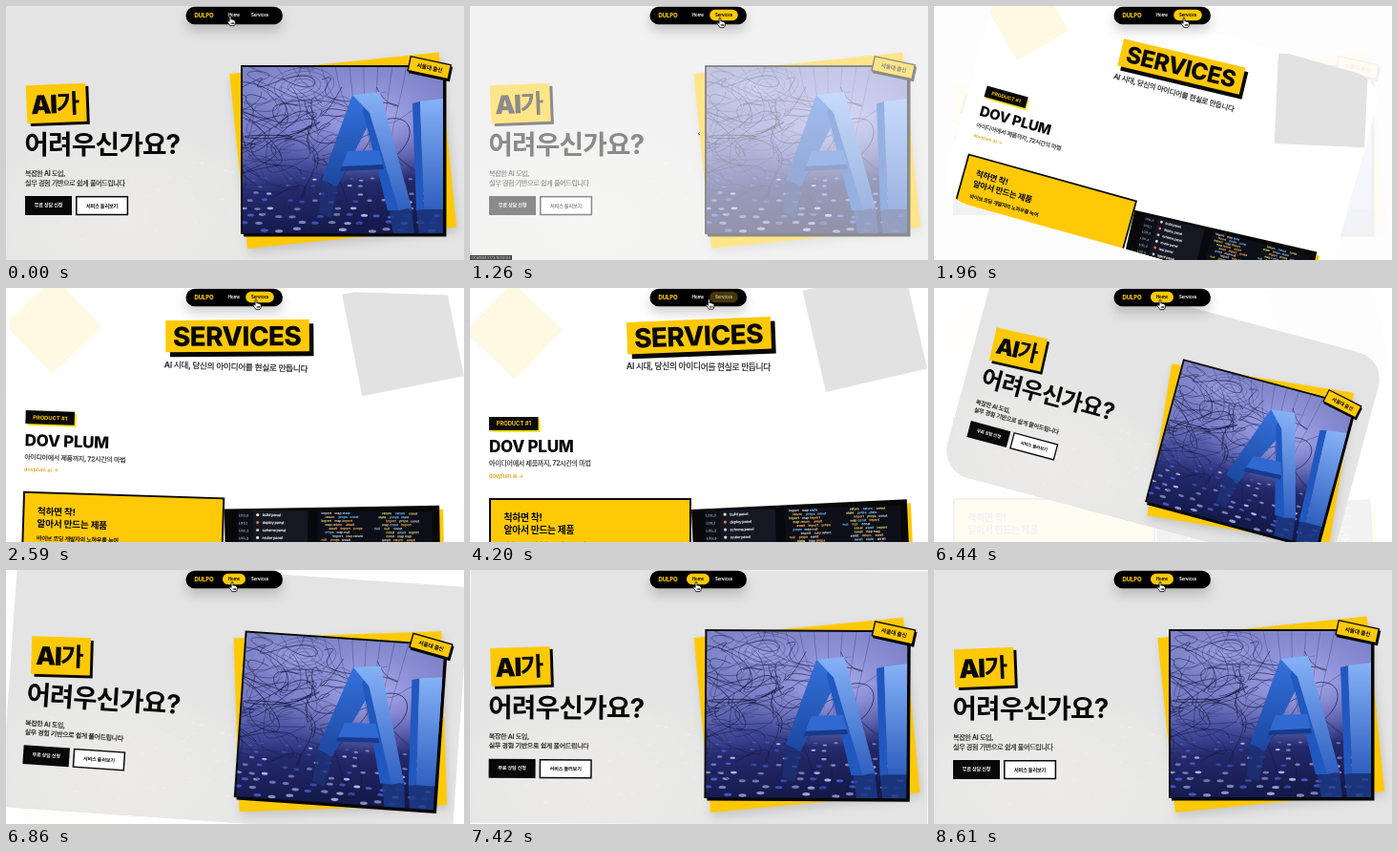
An HTML page for the animation above (8.68 s loop, 480 by 266 pixels).

```html
<!DOCTYPE html>
<html lang="ko">
<head>
<meta charset="utf-8">
<title>Page transition</title>
<style>
html, body { margin: 0; width: 100%; height: 100%; overflow: hidden; background: #fff; }
#stage { position: relative; width: 480px; height: 266px; overflow: hidden; background: #fff; }
.page { position: absolute; left: 0; top: 0; width: 480px; overflow: hidden; transform-origin: 240px 133px; }
#home { height: 266px; background: #e4e4e4; }
#services { height: 280px; background: #fff; }
svg { position: absolute; left: 0; top: 0; display: block; }
text { font-family: Inter, "Noto Sans CJK KR", "Noto Sans CJK", "Noto Sans", sans-serif; white-space: pre; }
.soft { filter: drop-shadow(2px 5px 5px rgba(0, 0, 0, .13)); }
#top { z-index: 5; }
#nav { filter: drop-shadow(0 7px 6px rgba(0, 0, 0, .18)); }
</style>
</head>
<body>
<div id="stage">
  <div class="page" id="home"></div>
  <div class="page" id="services"></div>
  <svg id="top" width="480" height="266"></svg>
</div>
<script>
const LOOP = 8680;
const YELLOW = '#ffc907';
const $ = id => document.getElementById(id);

function seeded(seed) {
  return () => {
    seed = (seed * 1664525 + 1013904223) % 4294967296;
    return seed / 4294967296;
  };
}
const rect = (x, y, w, h, fill, extra = '') =>
  `<rect x="${x}" y="${y}" width="${w}" height="${h}" fill="${fill}" ${extra}/>`;
const poly = (points, fill, extra = '') => `<polygon points="${points}" fill="${fill}" ${extra}/>`;

// Medium weight gets a hairline stroke, as the Korean face has no true medium
const text = (x, y, size, weight, str, { fill = '#080808', gap = -.04, mid = false, id = '' } = {}) =>
  `<text x="${x}" y="${y}" font-size="${size}" font-weight="${weight}" fill="${fill}"
    letter-spacing="${gap * size}" ${mid ? 'text-anchor="middle"' : ''} ${id && `id="${id}"`}
    ${weight === 500 ? `stroke="${fill}" stroke-width=".18"` : ''}>${str}</text>`;
const svg = (h, body) => `<svg width="480" height="${h}" viewBox="0 0 480 ${h}">${body}</svg>`;

// Pale globe with city lights behind the hero text
function globe() {
  const rnd = seeded(11);
  let out = `<defs>
    <radialGradient id="glow">
      <stop offset="0" stop-color="#ecebe8"/><stop offset=".6" stop-color="#e8e8e7"/>
      <stop offset="1" stop-color="#e4e4e4" stop-opacity="0"/>
    </radialGradient></defs>
    <ellipse cx="125" cy="225" rx="190" ry="130" fill="url(#glow)"/>`;
  for (let i = 0; i < 100; i++) {
    const x = 15 + rnd() * 225, y = 168 + rnd() * 95 - x * .08;
    out += `<ellipse cx="${x}" cy="${y}" rx="${.6 + rnd() * 2.6}" ry="${.4 + rnd() * .9}"
      fill="#f3f1e4" opacity="${.2 + rnd() * .5}"/>`;
  }
  return out;
}

// Rendered letters on a dotted floor with tangled wires
function artwork() {
  const rnd = seeded(5);
  const wire = (d, width, opacity) =>
    `<path d="${d}" fill="none" stroke="#12153a" stroke-width="${width}" opacity="${opacity}"/>`;
  let out = `<defs>
    <linearGradient id="room" x1="0" y1="0" x2=".12" y2="1">
      <stop offset="0" stop-color="#7e85c6"/><stop offset=".4" stop-color="#767bc6"/>
      <stop offset=".62" stop-color="#434a9a"/><stop offset=".75" stop-color="#242a6c"/>
      <stop offset="1" stop-color="#151a4c"/>
    </linearGradient>
    <linearGradient id="face" x1="0" y1="0" x2="0" y2="1">
      <stop offset="0" stop-color="#3572dd"/><stop offset="1" stop-color="#1b479f"/>
    </linearGradient>
    <linearGradient id="lit" x1="0" y1="0" x2="0" y2="1">
      <stop offset="0" stop-color="#86b2f7"/><stop offset="1" stop-color="#2f5fc0"/>
    </linearGradient>
    <radialGradient id="haze"><stop offset="0" stop-color="#b4b5f4"/>
      <stop offset="1" stop-color="#9a9be4" stop-opacity="0"/></radialGradient>
    <clipPath id="frame"><rect x="248" y="64" width="210" height="174"/></clipPath></defs>
    <g clip-path="url(#frame)">${rect(247, 63, 213, 177, 'url(#room)')}
    <ellipse cx="385" cy="118" rx="105" ry="68" fill="url(#haze)" opacity=".85"/>
    <ellipse cx="300" cy="88" rx="55" ry="28" fill="url(#haze)" opacity=".6"/>`;
  for (let row = 0; row < 8; row++) {
    const y = 180 + row * 7.6;
    for (let x = 246 + (row % 2) * 7; x < 460; x += 12.5 + row * .5) {
      if (rnd() < .28) continue;
      out += `<ellipse cx="${x + rnd() * 4}" cy="${y + rnd() * 3}" rx="${2.3 + row * .25}" ry="${1 + row * .1}"
        fill="${rnd() < .65 ? '#b3b9f2' : '#4a5cd0'}" opacity="${.5 + rnd() * .5}"/>`;
    }
  }
  out += poly('331,182 347,189 341,222 328,216', '#1d3378', 'opacity=".75"')
    + poly('402,214 425,211 428,240 406,240', '#1c3a86', 'opacity=".85"')
    + poly('430,212 458,212 458,240 433,240', '#1c3a86', 'opacity=".85"');
  for (let i = 0; i < 46; i++) {
    const x = 235 + rnd() * 105, y = 60 + rnd() * 125, p = () => (rnd() - .45) * 130;
    out += wire(`M${x} ${y} c${p()} ${p() * .6} ${p()} ${p() * .6} ${p() * .8} ${p() * .6}
      s${p()} ${p() * .4} ${p()} ${p() * .6}`, .35 + rnd() * .6, .5 + rnd() * .4);
  }
  for (let i = 1; i < 6; i++) {
    out += `<ellipse cx="309" cy="84" rx="${i * 7}" ry="${i * 3.8}" fill="none" stroke="#2b2f6b"
      stroke-width=".5" opacity=".7" transform="rotate(-8 309 84)"/>`;
  }
  for (let i = 0; i < 9; i++) {
    out += wire(`M${300 + i * 15} 62 c${30 - i * 6} ${60 + i * 5} ${70 - i * 13} ${10 + i * 9}
      ${60 - i * 4} ${75 + i * 6}`, .5, .5);
  }
  return out
    + poly('363,93 379,92 386,112 347,189 331,182', 'url(#face)')
    + poly('379,92 374,110 400,214 413,214', '#2158bf')
    + poly('363,93 392,90 425,211 412,214 381,112', 'url(#lit)')
    + poly('358,152 391,151 395,166 352,168', '#2f6ad2')
    + poly('352,168 395,166 396,171 350,173', '#173a8c')
    + poly('426,102 434,100 438,213 430,214', '#2158bf')
    + poly('434,100 458,97 460,213 438,213', 'url(#lit)') + '</g>';
}

function homePage() {
  return svg(266, globe()
    + `<g transform="rotate(-2.2 53 102)">${rect(25, 85, 62, 40, '#080808')}${rect(21.5, 82, 62.5, 40, YELLOW)}
      ${text(51, 112.2, 26.8, 900, 'AI가', { mid: true, gap: -.05 })}</g>`
    + text(19.2, 155, 27.8, 700, '어려우신가요?', { gap: -.03 })
    + text(20, 178, 7, 500, '복잡한 AI 도입,', { fill: '#1c1c1c' })
    + text(20, 187.6, 7, 500, '실무 경험 기반으로 쉽게 풀어드립니다', { fill: '#1c1c1c' })
    + rect(20, 199, 49, 20, '#080808')
    + text(44.5, 210.2, 5.1, 700, '무료 상담 신청', { fill: '#fff', mid: true, gap: -.02 })
    + rect(73.8, 199.7, 53.6, 18.8, '#fff', 'stroke="#080808" stroke-width="1.5"')
    + text(100.6, 210.8, 5.1, 700, '서비스 둘러보기', { mid: true, gap: -.02 })
    + `<g class="soft">${rect(243, 59.3, 220.5, 184, YELLOW, 'transform="rotate(-5.8 353.2 151.3)"')}</g>`
    + rect(249, 65, 212.5, 176.5, '#080808') + rect(246, 62, 213, 177, '#080808') + artwork()
    + `<g transform="rotate(12 444 64.7)">${rect(423.5, 58.7, 44, 16, '#080808')}
      ${rect(422.2, 57.1, 43, 15.2, YELLOW, 'stroke="#080808" stroke-width="1.4"')}
      ${text(444, 66.9, 5.8, 700, '서울대 출신', { mid: true, gap: -.02 })}</g>`);
}

// Dim code editor inside the tilted card
function editor() {
  const rnd = seeded(23);
  const words = ['const', 'return', 'import', 'await', 'map', 'props', 'state', 'null'];
  const tints = ['#d99a4e', '#6fa8d8', '#b7b9c4', '#c9c06a'];
  let out = rect(14, 1.5, 205, 60, '#0c0f17') + rect(30, 1.5, 58, 60, '#151822') + rect(88, 1.5, 10, 60, '#07090e');
  ['build', 'deploy', 'schema', 'router', 'test', 'agent'].forEach((name, i) => {
    const y = 6 + i * 8;
    out += text(15, y + 2, 3.6, 600, 'LOG_' + i, { fill: '#aeb2bd' })
      + `<circle cx="35" cy="${y}" r="1.6" fill="${['#e8e8e8', '#e0793c', '#c9ccd6'][i % 3]}"/>`
      + text(40, y + 1.5, 4, 500, name + ' panel', { fill: '#d5d7de' });
  });
  for (let i = 0; i < 13; i++) {
    for (const col of [102, 158]) {
      let x = col + Math.floor(rnd() * 4) * 4;
      for (let k = 0; k < 3; k++) {
        const word = words[Math.floor(rnd() * words.length)];
        out += text(x, 5 + i * 4, 3.4, 500, word, { fill: tints[Math.floor(rnd() * 4)], gap: 0 });
        x += word.length * 2 + 2;
      }
    }
  }
  return out;
}

function servicesPage() {
  return svg(280,
    rect(10, 9, 72, 72, '#fff8e3', 'transform="rotate(44 46 45)"')
    + rect(373, 0, 109, 109, '#e2e2e2', 'transform="rotate(-13 373 109)"')
    + `<g transform="rotate(-2.2 240 50)">${rect(169, 37.5, 151, 34, '#080808')}${rect(164.5, 33, 151, 33.5, YELLOW)}
      ${text(239.5, 60.2, 28, 800, 'SERVICES', { mid: true, gap: -.02 })}</g>`
    + text(239.5, 85.5, 8.75, 500, 'AI 시대, 당신의 아이디어를 현실로 만듭니다', { fill: '#1c1c22', mid: true })
    + rect(22.5, 137.5, 51, 13.5, '#ffe21a') + rect(20, 135, 51.5, 14, '#080808')
    + text(45.8, 144.3, 5.8, 700, 'PRODUCT #1', { fill: YELLOW, mid: true, gap: 0 })
    + text(20, 172.3, 17, 800, 'DOV PLUM', { gap: -.015 })
    + text(20, 186.5, 7, 500, '아이디어에서 제품까지, 72시간의 마법', { fill: '#33333a' })
    + text(20, 198.8, 5.5, 600, 'dovplum.ai →', { fill: '#dba51c', gap: 0 })
    + rect(21, 221, 210, 70, YELLOW, 'stroke="#080808" stroke-width="2"')
    + text(35.5, 244, 9.8, 700, '척하면 착!', { gap: -.03 })
    + text(35.5, 256.8, 9.8, 700, '알아서 만드는 제품', { gap: -.03 })
    + text(35.5, 271, 6.1, 500, '바이브 코딩 개발자의 노하우를 녹여')
    + `<g transform="translate(232 232) rotate(-2.7)">${rect(3, 4, 227, 70, YELLOW)}${rect(0, 0, 226, 70, '#080808')}
      <g transform="rotate(1.2)">${editor()}</g></g>`);
}

function overlay() {
  const pill = (id, x, w) => rect(x, 3.8, w, 11.4, YELLOW, `rx="5.7" id="${id}"`);
  return `<g id="nav">${rect(188.5, .8, 101.5, 18.4, '#000', 'rx="9.2"')}</g>`
    + pill('homePill', 227, 24) + pill('servicesPill', 251.2, 29.6)
    + text(197.5, 12.4, 6, 800, 'DULPO', { fill: YELLOW, gap: -.02 })
    + text(239, 11.3, 4.3, 700, 'Home', { mid: true, gap: -.01, id: 'homeText' })
    + text(266, 11.3, 4.3, 700, 'Services', { mid: true, gap: -.01, id: 'servicesText' })
    + `<g id="status">${rect(0, 261, 44, 5, '#4a4744')}<text id="url" x="1.5" y="265" font-size="3.7" fill="#d6d6d6"></text></g>`
    + `<path id="hand" d="M-.9 .9 Q0 -.5 .9 .9 V4.2 Q1.9 3.4 2.5 4.5 Q3.5 3.9 4 5 Q5.3 4.6 5.3 6 V8 Q5 9.6 4.2 10.6
      H-.2 Q-1 9 -2.6 7.2 Q-3.4 5.9 -2.3 5.6 Q-1.6 5.6 -.9 6.5Z M1.2 7.2 V9 M2.4 7.2 V9 M3.6 7.2 V9"
      fill="#fff" stroke="#000" stroke-width=".8" stroke-linejoin="round"/>`;
}

$('home').innerHTML = homePage();
$('services').innerHTML = servicesPage();
$('top').innerHTML = overlay();

const clamp = v => Math.max(0, Math.min(1, v));
const ease = p => p * p * (3 - 2 * p);

// Value at t from rows of [time, value]
function track(rows, t, curve = p => p) {
  for (let i = 1; i < rows.length; i++) {
    const [t0, a] = rows[i - 1], [t1, b] = rows[i];
    if (t < t1) return a + (b - a) * curve(clamp((t - t0) / (t1 - t0)));
  }
  return rows[rows.length - 1][1];
}

const GO_SERVICES = { click: 1020, enter: 1225 };
const GO_HOME = { click: 5490, enter: 5690 };
const handX = [[0, 235], [200, 236.5], [650, 262], [3930, 262], [4200, 250.5], [4460, 237]];
const handY = [[0, 10], [200, 11], [650, 12], [4200, 11.6], [4460, 12]];
const homeHover = [[20, 0], [150, 1], [380, 1], [530, 0], [4380, 0], [4560, 1]];
const servicesHover = [[480, 0], [630, 1], [4100, 1], [4240, 0]];

const settle = x => (1 + x) * Math.exp(-x);
const fade = ms => ms < 0 ? 1 : Math.exp(-ms / 315);

function enter(page, ms) {
  const s = Math.max(0, ms) / 1000;
  const x = s * (2.3 + s);
  const rest = settle(1.58 * x);
  page.style.opacity = 1;
  page.style.zIndex = 2;
  page.style.transform = `rotate(${45 * settle(x)}deg) scale(${1 - rest})`;
  page.style.borderRadius = `${270 * rest}px`;
}

function leave(page, ms) {
  page.style.opacity = fade(ms);
  page.style.zIndex = 1;
  page.style.transform = 'none';
  page.style.borderRadius = 0;
}

function hover(name, amount) {
  $(name + 'Pill').setAttribute('opacity', amount);
  const c = Math.round(255 * (1 - amount));
  $(name + 'Text').setAttribute('fill', `rgb(${c},${c},${c})`);
}

function draw(t) {
  const home = $('home'), services = $('services');
  home.style.visibility = t > 4000 && t < GO_HOME.enter ? 'hidden' : 'visible';
  services.style.visibility = t < GO_SERVICES.enter || t > 8200 ? 'hidden' : 'visible';
  if (t < GO_HOME.enter) leave(home, t - GO_SERVICES.click);
  else enter(home, t - GO_HOME.enter);
  if (t < GO_HOME.click) enter(services, t - GO_SERVICES.enter);
  else leave(services, t - GO_HOME.click);

  hover('home', track(homeHover, t));
  hover('services', track(servicesHover, t));
  const first = t >= 900 && t < 1650, second = t >= 4650 && t < 5600;
  $('status').style.visibility = first || second ? 'visible' : 'hidden';
  $('url').textContent = 'localhost:5173/' + (first ? 'services' : '');
  $('hand').setAttribute('transform', `translate(${track(handX, t, ease)} ${track(handY, t, ease)})`);
}

const start = performance.now();
function tick() {
  draw((performance.now() - start) % LOOP);
  requestAnimationFrame(tick);
}
draw(0);
requestAnimationFrame(tick);
</script>
</body>
</html>
```
